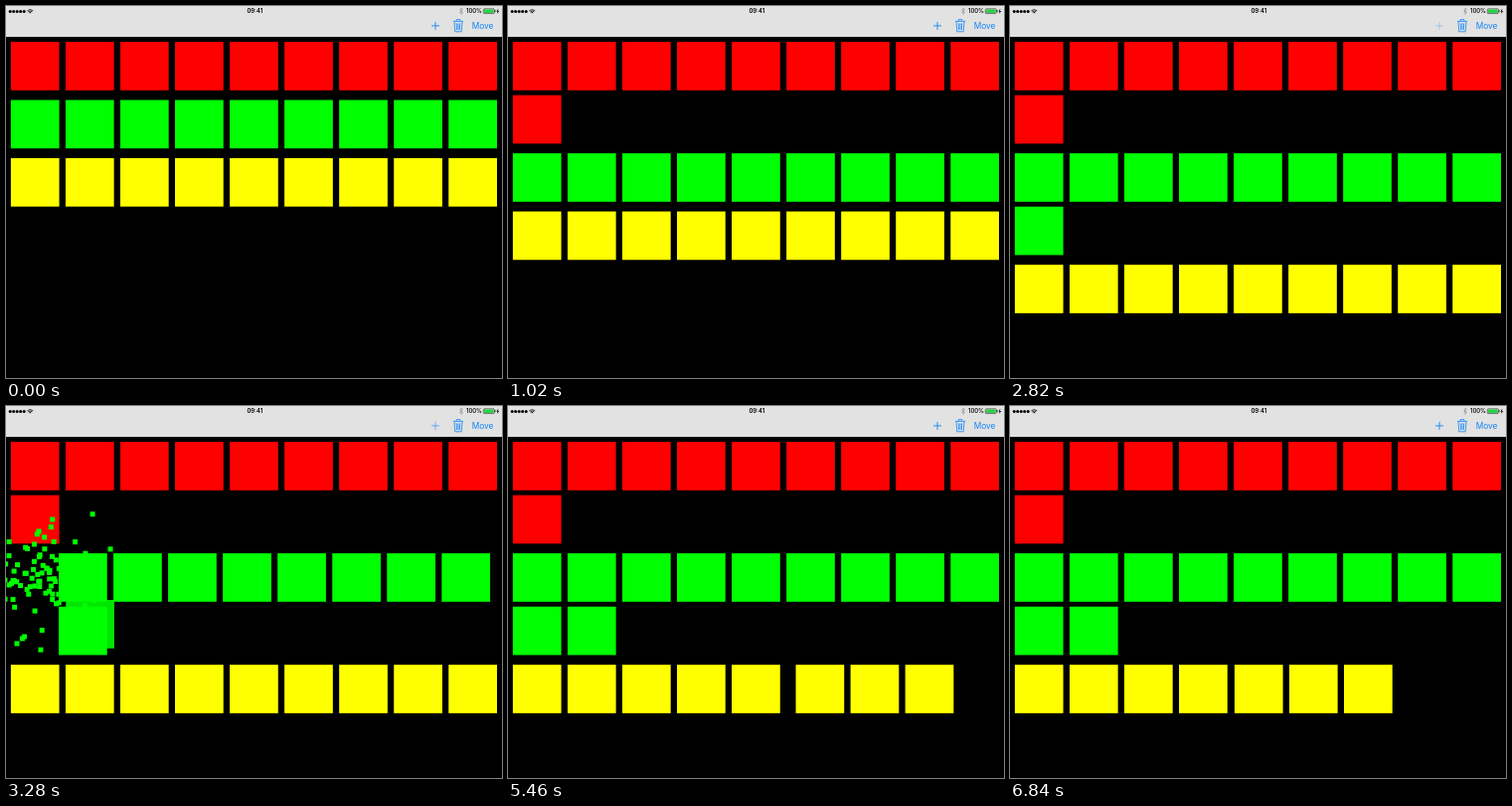
These frames come from a looping animation (499x374 px, 6.96 s). An HTML page with a canvas:

```html
<!DOCTYPE html>
<html lang="en">
<head>
<meta charset="utf-8">
<title>Grid insert and delete</title>
<style>
html, body { margin: 0; width: 100%; height: 100%; overflow: hidden; background: #000; }
canvas, svg { position: absolute; left: 0; top: 0; display: block; }
canvas { width: 499px; height: 374px; }
text { font-family: Inter, "Liberation Sans", sans-serif; }
</style>
</head>
<body>
<canvas id="grid"></canvas>
<svg width="499" height="32" viewBox="0 0 499 32">
  <rect width="499" height="31" fill="#e2e2e2"/>
  <g fill="#000">
    <circle cx="4.2" cy="5.4" r="1.5"/><circle cx="7.7" cy="5.4" r="1.5"/><circle cx="11.2" cy="5.4" r="1.5"/>
    <circle cx="14.7" cy="5.4" r="1.5"/><circle cx="18.2" cy="5.4" r="1.5"/>
    <path d="M24.3 7.6l-1.1-1.2q1.1-.9 2.2 0z"/>
    <text x="250.3" y="7.4" font-size="5.9" font-weight="600" text-anchor="middle">09:41</text>
    <text x="463" y="7.4" font-size="5.9" font-weight="500">100%</text>
    <path d="M495.4 2.6l-2 3h1.2l-.5 2.5 2.1-3.2h-1.3z"/>
  </g>
  <g fill="none" stroke="#000">
    <path d="M21.4 4.8q2.9-2.5 5.8 0M22.3 5.9q2-1.6 4 0" stroke-width=".8"/>
    <path d="M456.3 3.5l3.2 3.3-1.6 1.5V2l1.6 1.5-3.2 3.3" stroke="#888" stroke-width=".6"/>
    <rect x="480.3" y="2.8" width="11" height="4.8" rx=".8" stroke-width=".5"/>
  </g>
  <rect x="480.9" y="3.4" width="9.8" height="3.6" fill="#2fd04a"/>
  <path d="M492 4.2v2" stroke="#000" stroke-width=".8"/>
  <g fill="none" stroke="#1284fa" stroke-width=".9">
    <path id="add" d="M432 15.9v8M428 19.9h8"/>
    <path id="trash" d="M450 15.4h10M453.2 15.2v-1.6h3.6v1.6M451 15.6l.8 10.2h6.4l.8-10.2M453.3 17.4l.3 6.6M455 17.4v6.6M456.7 17.4l-.3 6.6" stroke-width=".8"/>
  </g>
  <text x="468.8" y="23.2" font-size="8.3" fill="#1284fa">Move</text>
</svg>
<script>
const LOOP = 6960, W = 499, H = 374;
const SIZE = 48.7, LEFT = 4.87, PITCH = 55.05, LINE = 53.6, SECTION = 58.45, TOP = 36.05;
const RED = "#f00", GREEN = "#0f0", YELLOW = "#ff0";
const TILES = 10, TILE = SIZE / TILES;
const LAG = 15, MOVE = 300, GATHER = 540;
const ADD_RED = 520, ADD_LAST = 1780, ADD_FIRST = 3040;
const DELETES = [{ at: 4580, slot: 4 }, { at: 5900, slot: 3 }];
const PRESSES = {
  add: [[320, 520], [1560, 1780], [2820, 3030]],
  trash: [[4260, 4560], [5680, 5890]]
};

const canvas = document.getElementById("grid");
const scale = window.devicePixelRatio || 1;
canvas.width = W * scale;
canvas.height = H * scale;
const ctx = canvas.getContext("2d");
ctx.scale(scale, scale);

const clamp = v => Math.min(1, Math.max(0, v));
const mix = (a, b, p) => a + (b - a) * p;
const rand = n => { const v = Math.sin(n * 12.9898) * 43758.5453; return v - Math.floor(v); };

// cubic-bezier(.42, 0, .58, 1)
function easeInOut(x) {
  if (x <= 0 || x >= 1) return clamp(x);
  let lo = 0, hi = 1, s = 0.5;
  for (let i = 0; i < 20; i++) {
    s = (lo + hi) / 2;
    const u = 1 - s;
    if (1.26 * u * u * s + 1.74 * u * s * s + s * s * s < x) lo = s; else hi = s;
  }
  return 3 * (1 - s) * s * s + s * s * s;
}
const ease = (t, start, length = MOVE) => easeInOut((t - start) / length);

// Position of a possibly fractional slot; wraps diagonally to the next line.
function slotPos(n, top) {
  const a = Math.floor(n), p = n - a;
  const x = i => LEFT + (i % 9) * PITCH;
  const y = i => top + Math.floor(i / 9) * LINE;
  return [mix(x(a), x(a + 1), p), mix(y(a), y(a + 1), p)];
}

function cell(n, top, color, alpha = 1) {
  const [x, y] = slotPos(n, top);
  ctx.globalAlpha = alpha;
  ctx.fillStyle = color;
  ctx.fillRect(x, y, SIZE, SIZE);
  ctx.globalAlpha = 1;
}

function eachTile(fn) {
  for (let i = 0; i < TILES * TILES; i++) fn(i, i % TILES, Math.floor(i / TILES));
}

// Scattered tiles fly together into a cell.
function gather(t, start, n, top, color, seed) {
  if (t < start) return;
  const p = ease(t, start + LAG, GATHER);
  if (p >= 1) return cell(n, top, color);
  const [x, y] = slotPos(n, top);
  ctx.fillStyle = color;
  eachTile((i, col, row) => {
    const angle = rand(i + seed) * Math.PI * 2;
    const r = 95 * rand(i + seed + 200) * (1 - p);
    ctx.fillRect(x + col * TILE + Math.cos(angle) * r, y + row * TILE + Math.sin(angle) * r, 5, 5);
  });
}

// Tiles drift off up-left and fade, sweeping from the left edge.
function crumble(age, n, top, color, seed) {
  const [x, y] = slotPos(n, top);
  ctx.fillStyle = color;
  ctx.strokeStyle = "#000";
  ctx.lineWidth = 0.7;
  eachTile((i, col, row) => {
    const p = clamp((age - col * 32 - rand(i + seed) * 60) / 200);
    if (p >= 1) return;
    const tx = x + col * TILE - 7 * p * (0.5 + 0.5 * rand(i + seed + 300));
    const ty = y + row * TILE - 6 * p * rand(i + seed + 600);
    ctx.globalAlpha = 1 - p * p;
    ctx.fillRect(tx, ty, 5, 5);
    if (p > 0) ctx.strokeRect(tx, ty, 5, 5);
  });
  ctx.globalAlpha = 1;
}

function drawRed(t) {
  for (let i = 0; i < 9; i++) cell(i, TOP, RED);
  cell(9, TOP, RED, ease(t, ADD_RED + LAG));
}

function drawYellow(t, top) {
  const slots = [0, 1, 2, 3, 4, 5, 6, 7, 8];
  for (const { at, slot } of DELETES) {
    if (t < at) break;
    const age = t - at;
    slots.splice(slot, 1);
    for (let i = slot; i < slots.length; i++) {
      slots[i] -= i === slot ? ease(age, 460, 200) : ease(age, 667);
    }
    if (age < 560) crumble(age, slot, top, YELLOW, at);
  }
  slots.forEach(n => cell(n, top, YELLOW));
}

function drawGreen(t, top) {
  const last = ease(t, ADD_LAST + LAG), first = ease(t, ADD_FIRST + LAG);
  const wrapping = first > 0 && first < 1;
  if (wrapping) cell(8 + first, top, GREEN, 0.9);
  for (let i = 0; i < 8; i++) cell(i + first, top, GREEN);
  cell(8 + last + first, top, GREEN);
  if (!wrapping) gather(t, ADD_LAST, 8 + first, top, GREEN, 11);
  gather(t, ADD_FIRST, 0, top, GREEN, 47);
}

function drawButtons(t) {
  for (const id in PRESSES) {
    let alpha = 1;
    for (const [down, up] of PRESSES[id]) {
      if (t >= down) alpha = t < up ? 0.3 : mix(0.3, 1, clamp((t - up) / 500));
    }
    document.getElementById(id).style.opacity = alpha;
  }
}

function draw(t) {
  ctx.fillStyle = "#000";
  ctx.fillRect(0, 0, W, H);
  const greenTop = TOP + SECTION + LINE * ease(t, ADD_RED + LAG);
  const yellowTop = greenTop + SECTION + LINE * ease(t, ADD_LAST + LAG);
  drawRed(t);
  drawYellow(t, yellowTop);
  drawGreen(t, greenTop);
  drawButtons(t);
}

const begin = performance.now();
function tick() {
  draw((performance.now() - begin) % LOOP);
  requestAnimationFrame(tick);
}
tick();
</script>
</body>
</html>
```
